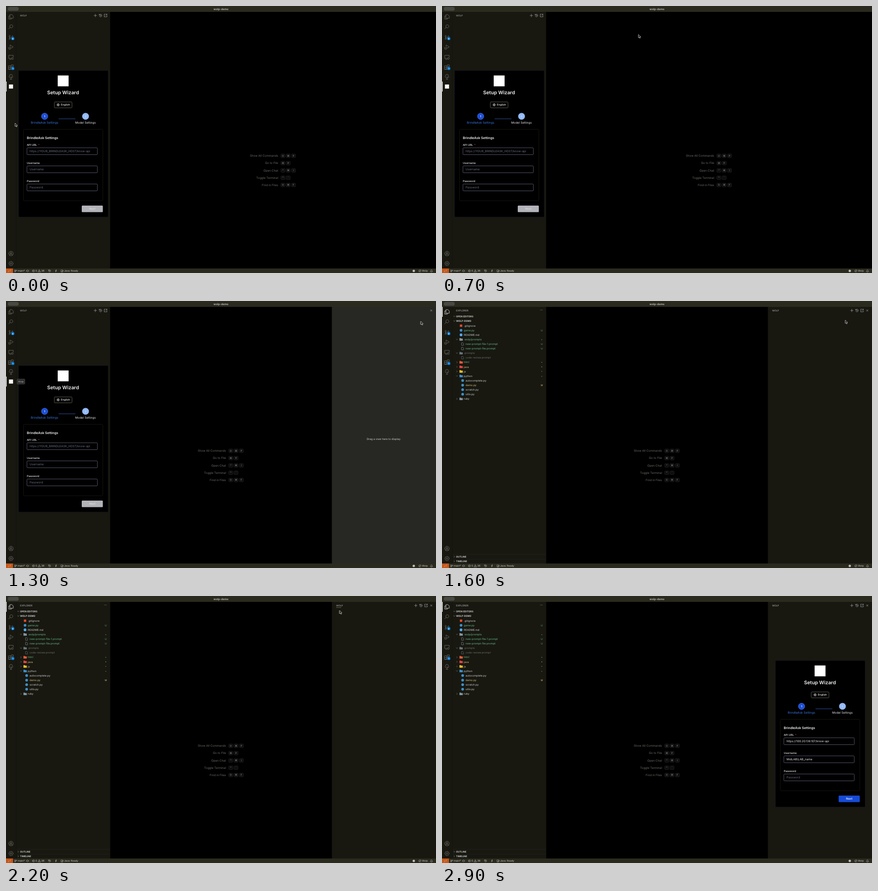
These frames come from a looping animation (948x590 px, 3000 ms). An HTML page:

```html
<!DOCTYPE html>
<html lang="en">
<head>
<meta charset="utf-8">
<title>wolp-demo</title>
<style>
html, body { margin: 0; width: 100%; height: 100%; overflow: hidden; background: #000; }
svg { display: block; }
text { font-family: Inter, "DejaVu Sans", sans-serif; text-rendering: geometricPrecision; white-space: pre; }
.line { fill: none; stroke-linecap: round; stroke-linejoin: round; }
.anim { animation: 3s -5ms step-end infinite; }

.before-drop { animation-name: before-drop; }
.after-drop { animation-name: after-drop; }
.drop-zone { animation-name: drop-zone; }
.tip { animation-name: tip; }
.panel { animation-name: panel; }
.hover { animation-name: hover; }
.loaded { animation-name: loaded; }
.hints { animation-name: hints; }
.cursor { animation-name: cursor; }

@keyframes before-drop { 0% { opacity: 1 } 50%, 100% { opacity: 0 } }
@keyframes after-drop { 0% { opacity: 0 } 50%, 100% { opacity: 1 } }
@keyframes drop-zone { 0% { opacity: 0 } 43.3333% { opacity: 1 } 50%, 100% { opacity: 0 } }
@keyframes tip { 0% { opacity: 0 } 33.3333% { opacity: 1 } 50%, 100% { opacity: 0 } }
@keyframes panel { 0% { opacity: 0 } 43.3333%, 100% { opacity: 1 } }
@keyframes hover { 0% { opacity: 0 } 73.3333% { opacity: 1 } 83.3333%, 100% { opacity: 0 } }
@keyframes loaded { 0% { opacity: 0 } 83.3333%, 100% { opacity: 1 } }
@keyframes hints { 0% { transform: none } 43.3333%, 100% { transform: translateX(-115px) } }
/* wander, hover the side icon, drag it to the right edge, then point at the new title */
@keyframes cursor {
  0% { transform: translate(20px, 259px); opacity: 1; animation-timing-function: steps(7, end) }
  23.3333% { transform: translate(433px, 63px); animation-timing-function: steps(3, end) }
  33.3333% { transform: translate(11px, 178px); animation-timing-function: steps(2, end) }
  40% { transform: translate(911px, 42.5px); animation-timing-function: steps(1, end) }
  43.3333% { transform: translate(914.5px, 45px); animation-timing-function: steps(4, end) }
  56.6667% { transform: translate(880.5px, 41.5px); animation-timing-function: steps(5, end) }
  73.3333% { transform: translate(735.5px, 32px); opacity: 1; animation-timing-function: step-end }
  83.3333%, 100% { transform: translate(735.5px, 32px); opacity: 0 }
}
</style>
</head>
<body>
<svg id="stage" width="948" height="590" viewBox="0 0 948 590"></svg>
<script>
const BG = '#181811', BAR = '#2a2a1e', FG = '#cccccc', DIM = '#747470';
const GREEN = '#64b987', YELLOW = '#d6bd80', BLUE = '#1d4ed8';

const rect = (x, y, w, h, fill, extra = '') =>
  `<rect x="${x}" y="${y}" width="${w}" height="${h}" fill="${fill}" ${extra}/>`;
const box = (x, y, w, h, stroke, r = 1, fill = 'none') =>
  rect(x, y, w, h, fill, `rx="${r}" stroke="${stroke}"`);
const disc = (x, y, r, fill) => `<circle cx="${x}" cy="${y}" r="${r}" fill="${fill}"/>`;
// y is the middle of the text line
const text = (x, y, s, size, fill = FG, weight = 400, anchor = 'start') =>
  `<text x="${x}" y="${y + size * 0.36}" font-size="${size}" fill="${fill}" font-weight="${weight}" text-anchor="${anchor}">${s}</text>`;
const mid = (x, y, s, size, fill, weight) => text(x, y, s, size, fill, weight, 'middle');
const group = (cls, body) => `<g class="anim ${cls}">${body}</g>`;
const icon = (x, y, d, stroke = DIM, width = 0.8) =>
  `<path class="line" transform="translate(${x} ${y})" d="${d}" stroke="${stroke}" stroke-width="${width}"/>`;
const ring = r => `M${-r} 0a${r} ${r} 0 1 0 ${2 * r} 0a${r} ${r} 0 1 0 ${-2 * r} 0`;

const I = {
  files: 'M-2-5h4l3 3v5h-7zM-2-2h-3v7h6v-2',
  search: 'M-2 1a3.4 3.4 0 1 1 2 1.2a3.4 3.4 0 0 1-2-1.2l-3 3.6',
  branch: 'M-3-4a1.5 1.5 0 1 0 .1 0M3-3a1.5 1.5 0 1 0 .1 0M-3 2a1.5 1.5 0 1 0 .1 0M-3-1v3M3 0q0 2-6 1',
  debug: 'M-2-1v-4l7 4.5l-5 3M-5 3a2 2 0 1 1 4 0a2 2 0 1 1-4 0M-5 1l-1-1M-1 1l1-1',
  monitor: 'M5 0v-4h-10v7h5M-3 5h3M1 3a2 2 0 1 0 4 0a2 2 0 1 0-4 0',
  blocks: 'M-5-3h4v8h-4zM-5 1h8v4h-8M1-5h4v4h-4z',
  tree: 'M0 5v-6M0 2l2-2M-2 2a3 3 0 0 1-1-5a3 3 0 0 1 6 0a3 3 0 0 1-1 5M-2 5h4',
  account: ring(5) + 'M-1.8-1a1.8 1.8 0 1 0 3.6 0a1.8 1.8 0 1 0-3.6 0M-3 4q0-3 3-3t3 3',
  plus: 'M-3 0h6M0-3v6',
  history: 'M-2.6-1.5a3 3 0 1 1-.2 2.6M-3-3v2h2M0-1.5v2h1.5',
  open: 'M-.5-3h-2.5v6h6v-2.5M1-3h2v2M3-3l-3.5 3.5',
  close: 'M-1.8-1.8l3.6 3.6M1.8-1.8l-3.6 3.6',
  globe: ring(2.7) + 'M-2.7 0h5.4M0-2.7q-2.4 2.7 0 5.4q2.4-2.7 0-5.4',
  right: 'M-.8-1.6l1.6 1.6l-1.6 1.6',
  down: 'M-1.6-.8l1.6 1.6l1.6-1.6',
  page: 'M-2-2.8h2.6l1.6 1.6v4h-4.2z',
};

function gear(x, y) {
  let d = ring(1.6);
  for (let i = 0; i <= 32; i++) {
    const a = i * Math.PI / 16, r = i % 4 < 2 ? 5 : 3.9;
    d += `${i ? 'L' : 'M'}${(r * Math.cos(a)).toFixed(1)} ${(r * Math.sin(a)).toFixed(1)}`;
  }
  return icon(x, y, d);
}

const badge = (x, y, s) => disc(x, y, 3.6, '#0078d4') + mid(x, y, s, 4.4, '#fff', 600);

function frame() {
  const bar = [['search', 46], ['branch', 69], ['debug', 91], ['monitor', 113], ['blocks', 135], ['tree', 157], ['account', 547]];
  return rect(0, 0, 948, 590, '#000') + rect(0, 0, 229.5, 590, BG) +
    rect(22, 13, 0.6, 567, '#101010') +
    rect(0, 0, 948, 13, BAR) + rect(4, 2, 24, 8.5, '#484844', 'rx="4"') +
    mid(474, 6.5, 'wolp-demo', 6, '#c4c4c4', 600) +
    bar.map(([k, y]) => icon(11, y, I[k])).join('') + gear(11, 569) +
    badge(15, 72, '8') + badge(15, 138, '1');
}

function status() {
  const y = 585.3, c = '#bdbdbd';
  const ic = (x, d) => icon(x, y, d, c, 0.6);
  return rect(0, 580, 948, 10, BAR) + rect(0, 580, 15.5, 10, '#c3581c') +
    icon(7.5, y, 'M-2.5-.5l1.5 1.4l-1.5 1.4M2.5-2.3l-1.5 1.4l1.5 1.4', '#f0d8c8', 0.6) +
    `<g transform="translate(21.5 ${y}) scale(.55)">${icon(0, 0, I.branch, c, 1.1)}</g>` +
    text(26, y, 'main*', 5.6) + ic(47.5, ring(2) + 'M-3 0h1M2 0h1') +
    ic(60.5, ring(2.4) + 'M-.9-.9l1.8 1.8M.9-.9l-1.8 1.8') + text(65, y, '0', 5.6) +
    ic(73.5, 'M0-2.4l2.7 4.8h-5.4zM0-.6v1.4') + text(77.8, y, '36', 5.6) +
    `<g transform="translate(96 ${y}) scale(.8)">${icon(0, 0, I.history, c)}</g>` +
    ic(110, 'M.8-2.6l-2 3h1.4l-.8 2.2l2.2-3.2h-1.5z') +
    ic(123.5, 'M-2-2h3.4v3.6h-3.4zM1.4-1h1.4v1.4h-1.4M-2 2.4h4') + text(128, y, 'Java: Ready', 5.4) +
    disc(899, y, 2.6, c) + ic(912.5, ring(2.4) + 'M-1.6 1.6l3.2-3.2') + text(917, y, 'Wolp', 5.4) +
    ic(938, 'M-2.3 1.5q.8-.8.8-2.3a1.5 1.5 0 0 1 3 0q0 1.5.8 2.3zM-.5 2.6h1');
}

const actions = x => icon(x, 21, I.plus, '#b4b4b4', 0.7) +
  icon(x + 11.3, 21, I.history, '#b4b4b4', 0.7) + icon(x + 22.5, 21, I.open, '#b4b4b4', 0.7);

function field(y, label, value, filled, required) {
  return text(46, y - 13.7, label, 5.8, '#e8e8e8', 500) +
    (required ? text(71, y - 13.7, '*', 5.8, '#d04444') : '') +
    box(46.2, y - 7.7, 155.2, 15.2, '#555768', 1.5) +
    text(52, y, value, filled ? 6.3 : 6.4, filled ? '#f0f0f0' : '#6c7180');
}

function wizard(filled) {
  const product = 'BrindleAsk';
  return box(28, 143, 197, 323, '#0b0b18', 1, '#000') +
    rect(114, 153.5, 24, 24, '#fff') +
    mid(125.8, 191.5, 'Setup Wizard', 10.8, '#f4f4f4', 600) +
    box(106.5, 212, 39, 13, '#5c5c50', 1.5) + icon(115, 218.4, I.globe, '#ddd', 0.6) +
    text(121, 218.4, 'English', 5.8, '#eee', 500) +
    rect(116, 248.8, 37, 1, '#34509f') +
    `<circle cx="85.2" cy="243.8" r="7" fill="${BLUE}" stroke="#3f6cd8"/>` + mid(85.2, 243.8, '1', 5.8, '#fff', 600) +
    disc(175.4, 243.8, 7.5, '#93bafa') + mid(175.4, 243.8, '2', 5.8, '#d8e6fc', 500) +
    mid(85, 258, product + ' Settings', 6.6, '#3a78e8') +
    mid(175.2, 258, 'Model Settings', 6.4, '#eee') +
    box(38.5, 272.5, 175, 158, '#151510', 2) +
    text(46, 291.5, product + ' Settings', 7.3, '#f2f2f2', 600) +
    field(321, 'API URL', filled ? 'https://100.20.138.107/know-api' : 'https://YOUR_BRINDLEASK_HOST/know-api', filled, true) +
    field(361, 'Username', filled ? 'MidLAB\\LAB_name' : 'Username', filled) +
    field(401, 'Password', 'Password', false) +
    rect(167, 441, 46.5, 14.5, filled ? '#174bd6' : '#b3b3ba', 'rx="1.5"') +
    mid(190.3, 448.2, 'Next', 6.3, filled ? '#fff' : '#deded2', 500);
}

function hints() {
  const rows = [['Show All Commands', '⇧⌘P'], ['Go to File', '⌘P'], ['Open Chat', '⌃⌘I'], ['Toggle Terminal', '⌃`'], ['Find in Files', '⇧⌘F']];
  return rows.map(([label, keys], i) => {
    const y = 331 + i * 16.15;
    return text(600, y, label, 6.4, '#6b6b63', 400, 'end') + [...keys].map((k, j) => {
      const x = 610.5 + j * 11.7;
      return box(x - 4.5, y - 4, 9, 8, '#1e1e1e', 1.5, '#0e0e0e') + mid(x, y, k, 5.2, '#8c8c88', 500);
    }).join('');
  }).join('');
}

const folder = (x, y, c) => `<path transform="translate(${x} ${y})" d="M-3.5-2.8h2.8l1 1h3.5v4.6h-7.3z" fill="${c}"/>`;

function explorer() {
  const GREY = '#84949d', OFF = '#6c6c6c';
  // depth, label, icon kind, icon colour, text colour, mark
  const rows = [
    [0, '.gitignore', 'square', '#e0492e', FG],
    [0, 'game.py', 'disc', '#3e8fc4', GREEN, 'U'],
    [0, 'README.md', 'info', '#3d9be0', FG],
    [0, '.wolp/prompts', 'down', GREY, GREEN, '•'],
    [1, 'new-prompt-file-1.prompt', 'page', GREY, GREEN, 'U'],
    [1, 'new-prompt-file.prompt', 'page', GREY, GREEN, 'U'],
    [0, '.prompts', 'down', '#66737a', OFF],
    [1, 'code-review.prompt', 'page', '#66737a', OFF],
    [0, 'html', 'right', '#e65a35', GREEN, '•'],
    [0, 'java', 'right', '#e84545', YELLOW, '•'],
    [0, 'js', 'right', '#f0bd2c', FG, '•'],
    [0, 'python', 'down', '#3d91cc', FG, '•'],
    [1, 'autocomplete.py', 'disc', '#3e8fc4', FG],
    [1, 'demo.py', 'disc', '#3e8fc4', YELLOW, 'M'],
    [1, 'scratch.py', 'disc', '#3e8fc4', FG],
    [1, 'utils.py', 'disc', '#3e8fc4', FG],
    [0, 'ruby', 'right', GREY, FG],
  ];
  const head = (y, s, open) => icon(27, y, open ? I.down : I.right, '#aaa', 0.6) + text(31, y, s, 5.2, FG, 700);
  const list = rows.map(([depth, label, kind, color, fill, mark], i) => {
    const y = 54.6 + i * 10.1, x = 42 + depth * 3.5;
    let pic;
    if (kind === 'square') pic = rect(x - 2.6, y - 2.6, 5.2, 5.2, color);
    else if (kind === 'disc') pic = disc(x, y, 3, color);
    else if (kind === 'info') pic = disc(x, y, 3.2, color) + mid(x, y, 'i', 5, '#fff', 700);
    else if (kind === 'page') pic = icon(x, y, I.page, color, 0.7);
    else pic = icon(33, y, I[kind], '#999', 0.6) + folder(x, y, color);
    return pic + text(48 + depth * 4, y, label, 5.8, fill) +
      (mark ? mid(220, y, mark, 5.2, fill === FG ? '#8a8a70' : fill) : '');
  }).join('');
  return rect(22.6, 13, 206.9, 567, BG) +
    text(31, 21, 'EXPLORER', 5.3, '#bdbdbd') + mid(219, 20, '···', 6, '#bbb', 700) +
    head(34, 'OPEN EDITORS', true) + head(44.3, 'WOLP-DEMO', true) + list +
    rect(23, 559.5, 206, 0.6, '#262622') + rect(23, 570, 206, 0.6, '#262622') +
    head(565, 'OUTLINE') + head(575.2, 'TIMELINE');
}

document.getElementById('stage').innerHTML =
  frame() +
  group('before-drop', icon(11, 24, I.files) + rect(0, 167, 1.3, 22, '#fff') + rect(6.5, 173.5, 9, 9, '#fff') +
    text(31, 21, 'WOLP', 5, '#bdbdbd') + actions(197) + wizard(false)) +
  group('after-drop', icon(11, 24, I.files, '#e4e4e4') + rect(0, 13, 1.3, 22, '#fff') + explorer()) +
  group('hints', hints()) +
  group('panel', rect(718.5, 13, 229.5, 567, BG)) +
  group('drop-zone', rect(718.5, 13, 229.5, 567, '#272723') +
    mid(833, 305, 'Drag a view here to display.', 5.8, '#cfcfcf')) +
  group('panel', icon(937.5, 21, I.close, '#b4b4b4', 0.7)) +
  group('after-drop', text(728, 21, 'WOLP', 5, '#c8c8c8') + actions(903.5)) +
  group('hover', rect(728, 25, 11, 0.8, '#77775c')) +
  group('loaded', `<g transform="translate(707.5 0)">${wizard(true)}</g>`) +
  group('tip', box(24.5, 172.5, 17, 11, '#454545', 1, '#2a2a2a') + mid(33, 178, 'Wolp', 5.2, '#bbb')) +
  status() +
  group('cursor', '<path d="M0 0v7l1.7-1.5l1.2 2.7l1.3-.6l-1.2-2.5h2.2z" fill="#000" stroke="#e6e6e6" stroke-width=".8" stroke-linejoin="round"/>');
</script>
</body>
</html>
```
